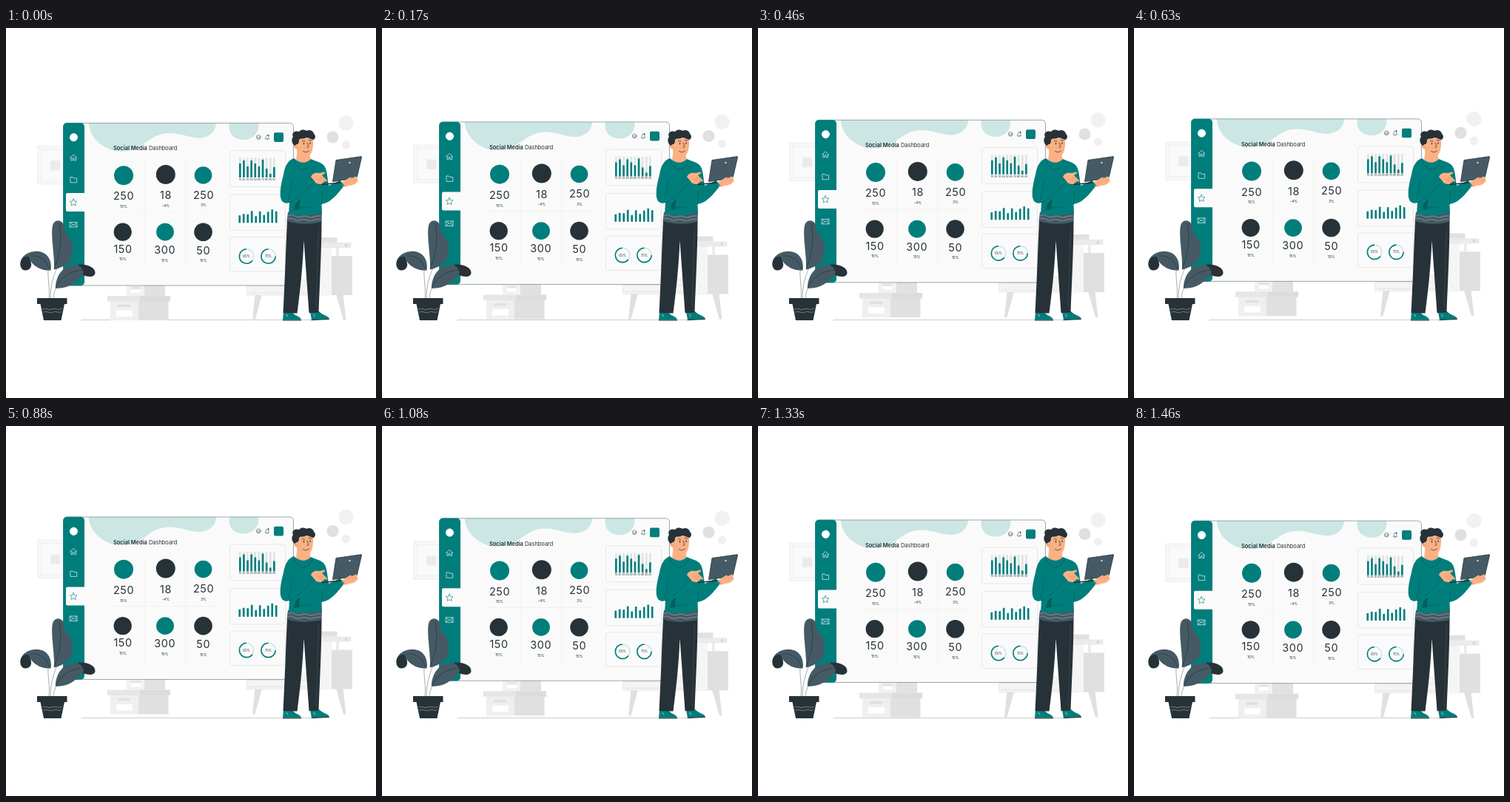
An HTML page that plays this animation: 500x500 px, repeating every 1.5 s.

```html
<!DOCTYPE html>
<html lang="en">
<head>
<meta charset="utf-8">
<title>Dashboard</title>
<style>
  html, body { margin: 0; width: 100%; height: 100%; overflow: hidden; background: #fff; }
  svg { display: block; width: 100vw; height: 100vh; }
  text { font-family: Inter, Roboto, sans-serif; fill: #263238; }
  .mid { text-anchor: middle; }
  .count { font-size: 14.4px; letter-spacing: .04em; }
  .line { fill: none; stroke-linecap: round; stroke-linejoin: round; }
  .teal { fill: #007e7c; }
  .dark { fill: #263238; }
  .slate { fill: #455a64; }
  .skin { fill: #fbb083; }
</style>
</head>
<body>
<svg viewBox="0 0 500 500">
  <defs>
    <clipPath id="screen"><rect x="77.5" y="128.5" width="311" height="219.5" rx="5"/></clipPath>
  </defs>

  <path class="line" d="M102 394.5H437" stroke="#aaa" stroke-width=".6"/>

  <g id="floating">
    <g id="wallFrame" stroke="#ebebeb" stroke-width=".7" fill="#f7f7f7">
      <path d="M42.5 159.5H90V211H42.5Z"/>
      <path d="M48 164.5H90V206H48Z" fill="#fafafa"/>
      <path d="M42.5 159.5l5.500 5M42.5 211l5.500-5"/>
      <path d="M60.5 179.5H73V192H60.5Z" fill="#ebebeb"/>
    </g>

    <g id="boxes">
      <path d="M163 340H187V362H163Z" fill="#f1f1f1"/>
      <path d="M187 340H215V362H187Z" fill="#e1e1e1"/>
      <path d="M169 345H182V358H169Z" fill="#fff"/>
      <path d="M169 349H182V353H169Z" fill="#e4e4e4"/>
      <path d="M141 369H179V395H141Z" fill="#efefef"/>
      <path d="M179 369H219.5V395H179Z" fill="#e0e0e0"/>
      <path d="M137 362H180.5V369.5H137Z" fill="#e6e6e6"/>
      <path d="M180.5 362H222V369.5H180.5Z" fill="#dcdcdc"/>
      <path d="M151 373.5H168V377H151Z" fill="#e0e0e0"/>
      <path d="M149 381.5H171V390H149Z" fill="#fff"/>
    </g>

    <g id="cabinet">
      <path d="M336.5 360H346L336.5 395H333ZM446 360H455.5L459.5 395H456Z" fill="#e0e0e0"/>
      <path d="M325.5 340H440V361H325.5Z" fill="#f4f4f4" stroke="#e2e2e2" stroke-width=".7"/>
      <path d="M328 349H438M328 358H438" stroke="#e0e0e0" stroke-width=".8"/>
      <path d="M422 296H440V361H422Z" fill="#f5f5f5"/>
      <path d="M440 308H468V361H440Z" fill="#e0e0e0"/>
      <path d="M420 283H447.5V290H420Z" fill="#e1e1e1"/>
      <path d="M418 290.5H466V296.5H418Z" fill="#ececec" stroke="#e0e0e0" stroke-width=".6"/>
      <path d="M446 296.5H450V308H446Z" fill="#ececec"/>
      <circle cx="459.5" cy="293.5" r="2" fill="#d6d6d6"/>
    </g>

    <circle cx="459.5" cy="128.5" r="10.2" fill="#f1f1f1"/>
    <circle cx="441.5" cy="147.5" r="8" fill="#e0e0e0"/>
    <circle cx="459.5" cy="158" r="5.700" fill="#f0f0f0"/>

    <g id="panel">
      <g clip-path="url(#screen)">
        <path d="M77 128H389V349H77Z" fill="#fafafa"/>
        <path d="M112 128C112 146 128 162 147 166C182 171 188 148 212 143C232 139 247 150 264 148.5C277 147 284 138 284 128Z" fill="#cce6e4"/>
        <path d="M302 128C299 142 308 152 324 151C337 149 343 138 341 128Z" fill="#cce6e4"/>
      </g>
      <rect x="77.5" y="128.5" width="311" height="219.5" rx="5" fill="none" stroke="#5f6c71" stroke-width=".6"/>
      <rect class="teal" x="77.2" y="128.3" width="28.8" height="220" rx="5"/>
      <path d="M106.500 223H83q-2 0-2 2v21q0 2 2 2h23.500Z" fill="#fafafa"/>

      <g class="line" stroke="#fff" stroke-width=".65">
        <circle cx="91.5" cy="147.8" r="5.2" fill="#fff"/>
        <path d="M86.700 175.500L91.200 171L95.700 175.500M88 174.500V179H90.200V176H92.200V179H94.500V174.500"/>
        <path d="M87 208.500V201.500H90.300L91.300 203H95.700V208.500Z"/>
        <path d="M86.500 262.500H96V269H86.500ZM86.500 262.500L91.300 266.500L96 262.500M86.500 269L89.800 265.500M96 269L92.700 265.500"/>
        <path stroke="#007e7c" d="M91.200 230.800L92.700 234L96 234.400L93.600 236.700L94.200 240L91.200 238.400L88.200 240L88.800 236.700L86.400 234.400L89.700 234Z"/>
      </g>

      <text x="145" y="165.3" font-size="7.45"><tspan font-weight="600">Social Media</tspan> Dashboard</text>

      <g class="line" stroke="#263238" stroke-width=".5">
        <circle cx="341.2" cy="147.5" r="2.9"/>
        <path d="M339.300 147.200q.7-1 1.400 0M341.800 147.200q.7-1 1.400 0M339.600 148.700q1.600 1.500 3.200 0"/>
        <path d="M350.500 149.500C351.700 148 350.700 145 353 144.700C355.200 145 354.200 148 355.400 149.500ZM352.300 150.700h1.400"/>
      </g>
      <circle class="teal" cx="354.6" cy="145" r="1.1"/>
      <rect class="teal" x="362" y="141.3" width="13" height="12.7" rx="2"/>

      <path d="M187 179V326M242.500 179V326M142 249H290" stroke="#f0f0f0" stroke-width=".7"/>
      <g id="stats"></g>

      <g fill="#fafafa" stroke="#dedede" stroke-width=".7">
        <rect x="302.5" y="165.5" width="75" height="49" rx="4"/>
        <rect x="302.5" y="225" width="75" height="48.5" rx="4"/>
        <rect x="302.5" y="282.5" width="75" height="46.5" rx="4"/>
      </g>
      <g id="charts"></g>
    </g>
  </g>

  <g id="plant">
    <g class="line">
      <path id="stems" d="M60 366C60 350 63 338 69 324M58 366C60 352 56 340 57 326M64 366C64 360 66 354 69 350" stroke="#fff" stroke-width="2"/>
      <use href="#stems" fill="none"/>
      <path d="M60 366C60 350 63 338 69 324M58 366C60 352 56 340 57 326M64 366C64 360 66 354 69 350" stroke="#69777e" stroke-width=".6"/>
    </g>
    <path class="slate" d="M60.500 327.500C63 311 53 300 38 302C29 303 21 308 19.500 317L33 315C41 325 50 328 60.500 327.500Z"/>
    <path class="dark" d="M33 315C36 321 33 327 27 327.500C20 328 18 320 20 315C22 310 27 308 31 309.500Z"/>
    <path class="slate" d="M65 326.500C66 308 60 280 63 267C65 259 73 258.500 77 264C79 268 79 275 82 279C89 286 91 294 90 303C89 315 80 323 65 326.500Z"/>
    <path class="slate" d="M67 351.500C67 332 80 319 96 320C104 320 111 324 115 328L102 335C93 345 83 353 67 351.500Z"/>
    <path class="dark" d="M97 320C109 318 121 324 120.500 331C120 337 112 337 104 334Q107 326 97 320Z"/>
    <path class="line" d="M65 325C74 304 76 284 72 264M67 351C75 335 89 328 104 327M59 326C55 314 47 307 34 308" stroke="#263238" stroke-width=".6"/>
    <path class="dark" d="M42 365H82.500V373H42ZM46.500 373H79L74.500 395H51Z"/>
    <path class="line" d="M49.500 380q3-1.500 6.500 0t6.500 0t6.500 0t7-1M50.500 384q3-1.500 6.500 0t6.500 0t6.500 0t5-1" stroke="#c3cbce" stroke-width=".5"/>
  </g>

  <g id="man">
    <path class="teal" d="M375 384L374 394.500H399C398 389 391 390 387 384ZM411 384L413 394.500L437 393C435 388 429 389 423 383Z"/>
    <path class="line" d="M374.500 395H398.500M413 394.700L436.500 393.200" stroke="#263238" stroke-width="1"/>
    <path class="line" d="M379 387l1.500 3M416 387l1 3" stroke="#fff" stroke-width=".6"/>
    <path class="dark" d="M380 260H426.500C426.500 300 424 343 422.500 384.500L409.500 385L402.500 287C401 325 397 358 393.500 385.500L374.500 385C377 340 378 300 380 260Z"/>
    <path class="line" d="M422 268C422 305 420 348 419 380" stroke="#56656c" stroke-width=".5" stroke-dasharray="2 2"/>
    <path class="slate" d="M381 249H427L426.500 262Q402 268 379.500 261Z"/>
    <path class="line" d="M381 254q5-3 9 0t9 1t9 0t9 0t9-1M380 258.500q5-3 9 0t9 1t9 0t9 0t9-1" stroke="#aab5ba" stroke-width=".6"/>

    <path class="skin" d="M394 162L392 178Q402 189 412 180L410 168Z"/>
    <path class="teal" d="M389 176C381 179 377 186 375 198C372 210 368 226 373 234Q376 238 383 236L382 251Q404 256 427 249L426.500 238C440 236 449 223 457 213L451 206L436 213C434 201 434 190 429 185C425 181 418 180 412 177Q402 187 389 176Z"/>
    <path class="line" d="M389 177Q393 190 402 191Q411 190 414 179M383 236C393 232 401 222 415 209M386 205Q387 219 382 232M426.500 238Q428 230 427 221M388 246Q398 240 415 243" stroke="#00605e" stroke-width=".7"/>
    <path d="M390 246Q389 235 398 232Q395 241 397 245Z" fill="#00605e"/>

    <path class="skin" d="M391 152C391 165 395 174 404 174.500C412 174.500 416 166 415 149L400 146Z"/>
    <circle class="skin" cx="392.5" cy="160" r="3.2"/>
    <path class="dark" d="M390 159C385 155 386 149 388 147C385 142 391 138 396 140C400 136 405 138 406 139C411 136 416 140 416 143C420 146 417 151 415 151C411 150 409 148 406 148C401 151 398 148 396 151C396 155 395 157 393 157Z"/>
    <path class="line" d="M400 153q2-1.500 4 0M409 152q2-1.500 4 0M407 155l2 5.500q-1 1.200-2.300 .6M401.500 166.500q4.500 3 8-.8" stroke="#263238" stroke-width=".7"/>
    <path d="M402.500 155.300v1.600M411 154.800v1.600" stroke="#263238" stroke-width="1.200" stroke-linecap="round"/>
    <path class="line" d="M391 159.500q2 0 2.500 2.500" stroke="#d98762" stroke-width=".6"/>

    <path class="line" d="M427 211.500L452 209" stroke="#263238" stroke-width="1.500"/>
    <path class="slate" d="M446 178.500L479.500 173.700Q481 173.500 480.500 175L474 203L441.500 207.500Z" stroke="#263238" stroke-width=".8"/>
    <circle cx="464.5" cy="182" r="1.1" fill="#fff"/>
    <path class="skin" d="M412 202C413 196 419 195 424 196L430 194.500Q432 195 430 197L427 199L434 206Q435 208 431 207L426 211Q419 211 417 208ZM453 209L463 203Q466 200 467 203L473 200.500Q476 201 474 204L476 206Q472 213 464 213L457 215Z"/>
    <path class="line" d="M424 201l7 5M421 203l7 5M467 203l-4 4M473 204l-4 4" stroke="#d98762" stroke-width=".6"/>
    <path class="line" d="M412 202L418 209M451 206L457 213" stroke="#00605e" stroke-width="1"/>
  </g>
</svg>

<script>
const TEAL = '#007e7c', DARK = '#263238', GREY = '#dfe3e4';
const LOOP = 1500, RISE = 6.7;
const get = id => document.getElementById(id);

const label = (x, y, size, value) =>
  `<text class="mid" x="${x}" y="${y}" font-size="${size}">${value}</text>`;

const bar = (x, bottom, height, fill) =>
  `<rect x="${x - 1.3}" y="${bottom - height}" width="2.6" height="${height}" fill="${fill}"/>`;

const stat = ([x, y, r, fill, value, change, textX, baseline]) =>
  `<circle cx="${x}" cy="${y}" r="${r}" fill="${fill}"/>
   <text class="mid count" x="${textX}" y="${baseline}">${value}</text>` +
  label(textX, baseline + 10.6, 5, change);

const ring = (x, percent) =>
  `<g transform="translate(${x} 308.5) scale(-1 1) rotate(-90)" fill="none" stroke-width="1.6">
     <circle r="9.7" stroke="#cce6e4"/>
     <circle r="9.7" stroke="${TEAL}" pathLength="100" stroke-dasharray="${percent} 100"/>
   </g>` + label(x, 310.1, 4.3, percent + '%');

get('stats').innerHTML = [
  [159, 199.2, 13, TEAL, '250', '15%', 159, 232.5],
  [215.8, 198, 13, DARK, '18', '-4%', 216, 231.3],
  [266.5, 199, 11.8, TEAL, '250', '3%', 267, 230.8],
  [157.7, 275.7, 12.1, DARK, '150', '15%', 158, 303.8],
  [215, 275.7, 11.9, TEAL, '300', '15%', 214.7, 305],
  [266.5, 275.7, 12.3, DARK, '50', '15%', 266.7, 305.7]
].map(stat).join('');

const sessions = [19, 23, 15, 23, 19, 15, 24, 12, 5, 14];
const visits = [10, 12, 11.5, 16, 9, 15.5, 10.5, 15, 18, 15.5];
get('charts').innerHTML =
  sessions.map((height, i) => {
    const x = 316.3 + i * 5.12;
    return bar(x, 202, 26.5, GREY) + bar(x, 202, height, TEAL) + label(x, 205.7, 3.3, (i + 1) * 10 % 100 || '00');
  }).join('') +
  visits.map((height, i) => bar(315.7 + i * 5.5, 263.3, height, TEAL)).join('') +
  ring(325, 65) + ring(354.5, 75);

// Linear rise for half the loop, then linear fall.
function draw() {
  const phase = performance.now() % LOOP / LOOP;
  const lift = RISE * (1 - Math.abs(1 - 2 * phase));
  get('floating').setAttribute('transform', `translate(0 ${-lift})`);
  requestAnimationFrame(draw);
}
draw();
</script>
</body>
</html>
```
